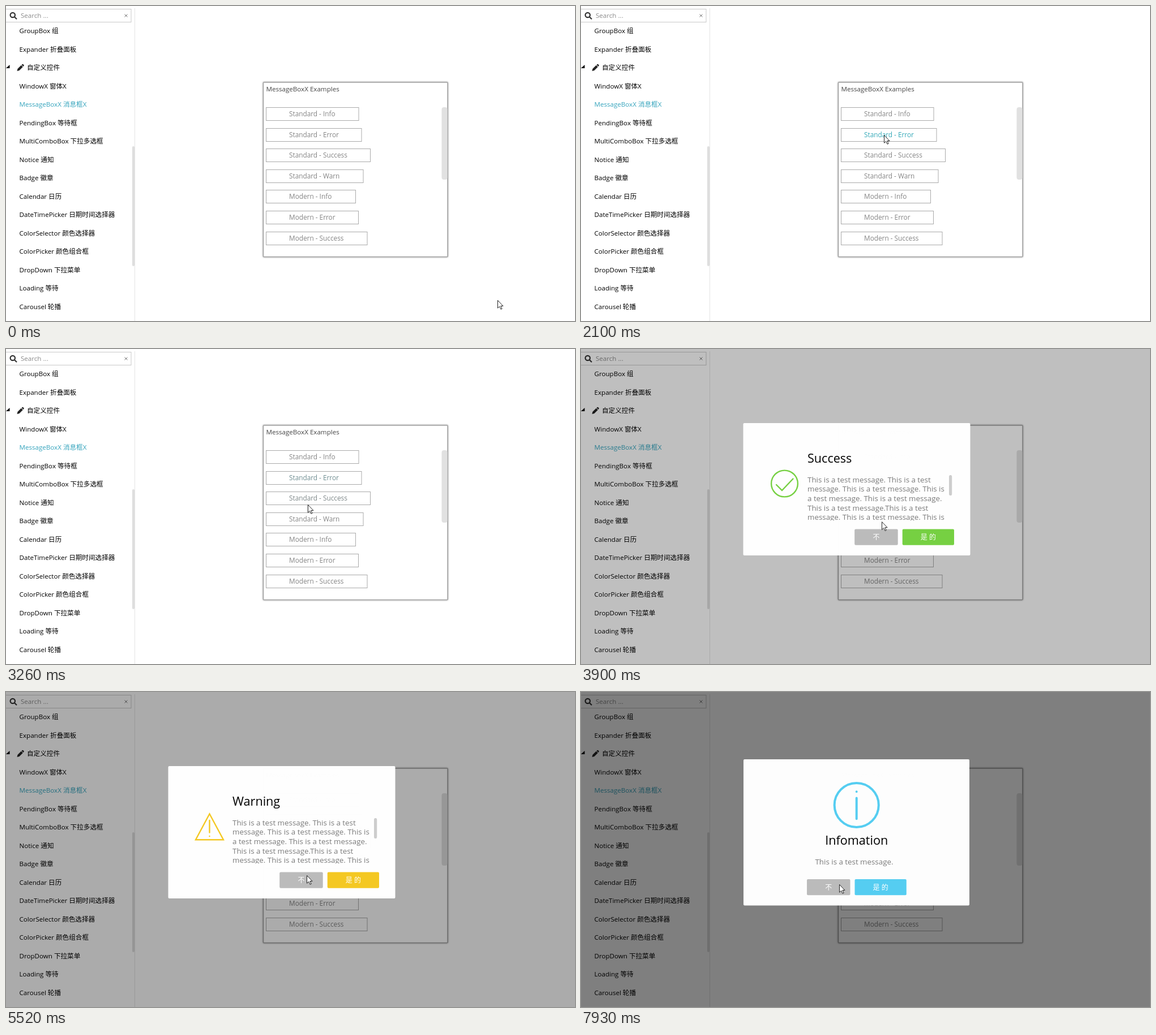
An HTML page that plays this animation: 1005x557 px, repeating every 7990 ms.

```html
<!DOCTYPE html>
<html lang="zh-CN">
<head>
<meta charset="utf-8">
<title>MessageBoxX</title>
<style>
html, body { margin: 0; width: 100%; height: 100%; overflow: hidden; background: #fff; }
svg { display: block; width: 1005px; height: 557px; font: 11.6px "Open Sans", "Noto Sans CJK SC", "Noto Sans CJK", sans-serif; }
.active { fill: #35a4bd; }
.option { color: #858585; font-size: 11.8px; }
.option rect { fill: none; stroke: #b0b0b0; stroke: color-mix(in srgb, currentColor 70%, #fff); }
.option text { fill: currentColor; }
.title { font-size: 21.6px; }
.message { font-size: 13.35px; fill: #7b7b7b; }
.answer { font-size: 12px; fill: #fff; text-anchor: middle; }
.dialog, #mask { opacity: 0; }
.icon { fill: none; stroke-width: 2.4; stroke-linecap: round; }
</style>
</head>
<body>
<svg id="stage" viewBox="0 0 1005 557">
  <rect x="-2" y="5.5" width="223" height="23" fill="#fff" stroke="#c9c9c9"/>
  <g fill="none" stroke="#333" stroke-width="2.2">
    <circle cx="11.8" cy="16" r="4.2"/><path d="M15 19.2l4 4"/>
  </g>
  <text x="26" y="21" fill="#8b8b8b">Search ...</text>
  <path d="M209.5 14.5l5 5m0-5l-5 5" stroke="#777"/>
  <g id="menu"></g>
  <path d="M6.5 104v6h-6.500z"/>
  <path d="M19.500 115l1-4 6.300-6.300 3 3-6.300 6.300zM27.500 104l1-1q1-.7 2 .2l.9.9q.8 1 0 1.800l-1 1z" fill="#222"/>
  <rect x="223" y="248" width="4" height="212" rx="2" fill="#dedede"/>
  <path d="M227.500 4V557" stroke="#e3e3e3"/>

  <rect x="454.500" y="135" width="325.500" height="308.500" rx="1" fill="#fff" stroke="#a2a2a2" stroke-width="1.500" style="filter:drop-shadow(0 0 1.500px #999)"/>
  <text x="459.500" y="151" fill="#444">MessageBoxX Examples</text>
  <rect x="769.500" y="179" width="10" height="128" rx="4" fill="#e1e1e1"/>
  <g id="options"></g>

  <rect id="mask" width="1005" height="557"/>
  <g id="dialogs"></g>
  <path id="cursor" d="M.5.500V14.200L3.700 11.300 6 16.300 8.100 15.300 5.900 10.500H10z" fill="#fff" stroke="#222" stroke-linejoin="round"/>
</svg>

<script>
const LOOP = 7990, FADE = 350;
const byId = id => document.getElementById(id);

const menu = ['GroupBox 组', 'Expander 折叠面板', '自定义控件', 'WindowX 窗体X', 'MessageBoxX 消息框X',
  'PendingBox 等待框', 'MultiComboBox 下拉多选框', 'Notice 通知', 'Badge 徽章', 'Calendar 日历',
  'DateTimePicker 日期时间选择器', 'ColorSelector 颜色选择器', 'ColorPicker 颜色组合框',
  'DropDown 下拉菜单', 'Loading 等待', 'Carousel 轮播'];
byId('menu').innerHTML = menu.map((label, i) =>
  `<text x="${i === 2 ? 37 : 23.5}" y="${48 + 32.53 * i}" ${i === 4 ? 'class="active"' : ''}>${label}</text>`).join('');

// hover: when the highlight starts and ends
const options = [
  { label: 'Standard - Info', width: 163.5, hover: [430, 1800] },
  { label: 'Standard - Error', width: 168.5, hover: [1900, 3150] },
  { label: 'Standard - Success', width: 184, hover: [3250, 4650] },
  { label: 'Standard - Warn', width: 171.5, hover: [4750, 6900] },
  { label: 'Modern - Info', width: 158, hover: [6950, LOOP] },
  { label: 'Modern - Error', width: 163 },
  { label: 'Modern - Success', width: 178.5 }
];
byId('options').innerHTML = options.map(({ label, width }, i) => {
  const y = 179.5 + Math.round(36.6 * i);
  return `<g class="option"><rect x="459.5" y="${y}" width="${width}" height="23"/>
    <text x="500" y="${y + 15.7}">${label}</text></g>`;
}).join('');

const ring = '<circle r="23.4"/>';
const icons = {
  info: ring + '<path d="M0-7.500V14.500M0-14.200v.01"/>',
  error: ring + '<path d="M-10.500-10.500l21 21m0-21l-21 21"/>',
  success: ring + '<path d="M-14.500 2l10 10L15-8.500"/>',
  warn: '<path d="M0-22.500L24.500 23.300h-49z" stroke-linecap="butt"/><path d="M0-11V10.500M0 17v.01"/>'
};
const short = ['This is a test message.'];
const long = ['This is a test message. This is a test', 'message. This is a test message. This is',
  'a test message. This is a test message.', 'This is a test message.This is a test',
  'message. This is a test message. This is'];

// Each layout holds the box, icon, text and button positions
const compact = { box: [287, 150.5, 399, 195], icon: [360.5, 238, 1], title: [401, 233.3], text: [401, 268.5], no: [482, 299], lines: short };
const scrolled = { box: [286.5, 131, 401, 234], icon: [359.5, 238, 1], title: [400, 201], text: [400, 235.8], no: [483.2, 318.5], lines: long };
const modern = { box: [287, 119, 399, 258.5], icon: [486.7, 200, 1.67], title: [486.7, 270], text: [482.5, 304.8], no: [399, 331], lines: short, anchor: 'middle' };

const dialogs = [
  { layout: compact, icon: 'info', title: 'Infomation', color: '#55cdf1', open: 690, close: 1400 },
  { layout: scrolled, icon: 'error', title: 'Error', color: '#ff4d4d', open: 2250, close: 2870 },
  { layout: scrolled, icon: 'success', title: 'Success', color: '#76d042', open: 3725, close: 4400 },
  { layout: scrolled, icon: 'warn', title: 'Warning', color: '#f4c823', open: 5290, close: 5970 },
  { layout: modern, icon: 'info', title: 'Infomation', color: '#55cdf1', open: 7250, close: LOOP }
];

const box = ([x, y, w, h], fill, extra = '') =>
  `<rect x="${x}" y="${y}" width="${w}" height="${h}" rx="2" fill="${fill}" ${extra}/>`;

function answer(x, y, width, label, fill) {
  return box([x, y, width, 28.3], fill) +
    `<text class="answer" x="${x + width / 2}" y="${y + 18.6}">${label}</text>`;
}

function dialogMarkup({ layout, icon, title, color }) {
  const { lines, anchor = 'start' } = layout;
  const [ix, iy, scale] = layout.icon, [tx, ty] = layout.title, [nx, ny] = layout.no;
  const [mx, my] = layout.text;
  const messageX = anchor === 'middle' ? tx - 4.2 : mx;
  const body = lines.map((line, i) =>
    `<text class="message" text-anchor="${anchor}" x="${messageX}" y="${my + 16.6 * i}">${line}</text>`).join('');
  const clip = lines.length > 1 ? 'style="clip-path:polygon(0 0,100% 0,100% 96.500%,0 96.500%)"' : '';
  const scrollbar = lines.length > 1 ? box([650, 223, 5.2, 36], '#cdcdcd', 'ry="2.5"') : '';
  return `<g class="dialog">${box(layout.box, '#fff', 'fill-opacity=".987"')}
    <g class="icon" stroke="${color}" transform="translate(${ix} ${iy}) scale(${scale})">${icons[icon]}</g>
    <text class="title" text-anchor="${anchor}" x="${tx}" y="${ty}">${title}</text>
    <g ${clip}>${body}</g>${scrollbar}
    ${answer(nx, ny, 76.5, '不', '#bbb')}${answer(nx + 84.5, ny, 91.3, '是 的', color)}</g>`;
}
byId('dialogs').innerHTML = dialogs.map(dialogMarkup).join('');

// Loops a property through [time, value] points
function track(element, property, points) {
  const padded = [[0, points[0][1]], ...points, [LOOP, points.at(-1)[1]]];
  const animation = element.animate(
    padded.map(([time, value]) => ({ offset: Math.min(time / LOOP, 1), [property]: value })),
    { duration: LOOP, iterations: Infinity });
  animation.startTime = 0 + startTime;
}
const startTime = document.timeline.currentTime ?? 0;

const maskPoints = [];
document.querySelectorAll('.dialog').forEach((element, i) => {
  const { open, close } = dialogs[i];
  const closes = close < LOOP;
  track(element, 'opacity', [[open, 0], [open, 1], ...(closes ? [[close, 1], [close, 0]] : [])]);
  maskPoints.push([open, 0], [open + FADE, .5]);
  if (closes) maskPoints.push([close, .5], [close + FADE, 0]);
});
track(byId('mask'), 'opacity', maskPoints);

document.querySelectorAll('.option').forEach((element, i) => {
  if (!options[i].hover) return;
  const [enter, leave] = options[i].hover, idle = '#858585', lit = '#35a9b8';
  const fadeOut = leave < LOOP ? [[leave, lit], [leave + 150, idle]] : [];
  track(element, 'color', [[enter, idle], [enter + 150, lit], ...fadeOut]);
});

const cursorPath = [
  [70, 868, 520], [350, 660, 290], [500, 575, 195], [690, 568, 192], [1020, 545, 247], [1250, 522, 310],
  [1420, 522, 310], [1950, 535, 228], [2250, 535, 228], [2550, 532, 319],
  [2870, 532, 319], [3350, 533, 265], [3725, 533, 265], [3900, 531, 305], [4050, 531, 325],
  [4400, 531, 325], [4800, 531, 300], [5290, 531, 300], [5500, 531, 324], [5530, 531, 324],
  [5600, 512, 322], [5830, 496, 330], [6300, 496, 330], [6900, 573, 338],
  [7250, 573, 338], [7610, 561, 331], [7850, 445, 337], [7930, 456, 340]
];
track(byId('cursor'), 'transform', cursorPath.map(([time, x, y]) => [time, `translate(${x}px, ${y}px)`]));
</script>
</body>
</html>
```
